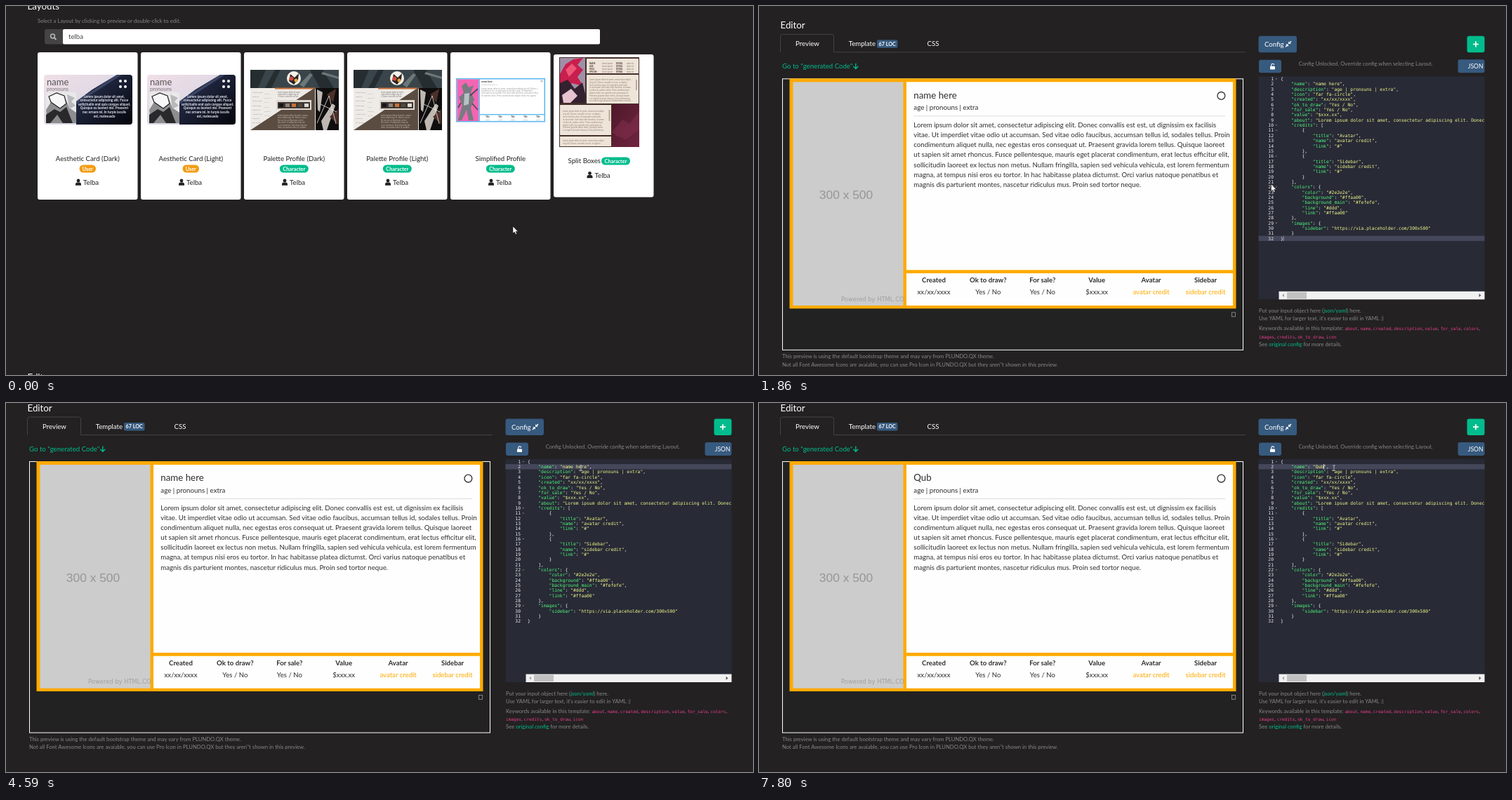
Recreate the animation shown at these times as an HTML page. Size 1064x526 px, loop 8000 ms.

```html
<!DOCTYPE html>
<html lang="en">
<head>
<meta charset="utf-8">
<title>Layout editor</title>
<style>
html, body { margin: 0; width: 100%; height: 100%; overflow: hidden; background: #232122; }
svg { display: block; width: 100%; height: 100%; font: 9.65px Lato, sans-serif; }
text { white-space: pre; }
.mono { font-family: "DejaVu Sans Mono", monospace; }
.mid { text-anchor: middle; }
.end { text-anchor: end; }
.bold { font-weight: 700; }
.hover text.link { text-decoration: underline; }
</style>
</head>
<body>
<svg id="stage" viewBox="0 0 1064 526"></svg>
<script>
const LOOP = 8000, BASE = 9.65, SMALL = 7.7, HEAD = 13.3;
const GREEN = '#00bc8c', BLUE = '#375a7f', GREY = '#888', INK = '#2e2e2e', ORANGE = '#ffaa00';
const AUTHOR = 'Telba', CODE_X = 743, CHAR = 3.825, LINE = 7.34, FULL_SCROLL = 522;

const rect = (x, y, w, h, fill, rx = 0, extra = '') =>
  `<rect x="${x}" y="${y}" width="${w}" height="${h}" fill="${fill}" rx="${rx}" ${extra}/>`;
const path = (d, fill, extra = '') => `<path d="${d}" fill="${fill}" ${extra}/>`;
const stroke = (d, color, width) => path(d, 'none', `stroke="${color}" stroke-width="${width}"`);
const circle = (x, y, r, fill, extra = '') => `<circle cx="${x}" cy="${y}" r="${r}" fill="${fill}" ${extra}/>`;
const text = (x, y, str, size, fill, cls = '', extra = '') =>
  `<text x="${x}" y="${y}" font-size="${size}" fill="${fill}" class="${cls}" ${extra}>${str}</text>`;
const span = (str, fill, extra = '') => `<tspan fill="${fill}" ${extra}>${str}</tspan>`;
const group = (x, y, body, extra = '') => `<g transform="translate(${x} ${y})" ${extra}>${body}</g>`;
const repeat = (n, make) => Array.from({ length: n }, (_, i) => make(i)).join('');

const lorem = [
  'Lorem ipsum dolor sit amet, consectetur adipiscing elit. Donec convallis est est, ut dignissim ex facilisis',
  'vitae. Ut imperdiet vitae odio ut accumsan. Sed vitae odio faucibus, accumsan tellus id, sodales tellus. Proin',
  'condimentum aliquet nulla, nec egestas eros consequat ut. Praesent gravida lorem tellus. Quisque laoreet',
  'ut sapien sit amet rhoncus. Fusce pellentesque, mauris eget placerat condimentum, erat lectus efficitur elit,',
  'sollicitudin laoreet ex lectus non metus. Nullam fringilla, sapien sed vehicula vehicula, est lorem fermentum',
  'magna, at tempus nisi eros eu tortor. In hac habitasse platea dictumst. Orci varius natoque penatibus et',
  'magnis dis parturient montes, nascetur ridiculus mus. Proin sed tortor neque.'
];
const loremText = lorem.join(' ');
const tiny = (x, y, rows, gap, chars, size, fill, cls) =>
  repeat(rows, i => text(x, y + i * gap, loremText.substr(i * chars, chars).trim(), size, fill, cls));

// ---- layout thumbnails, drawn relative to the left edge of their card ----
const aestheticThumb = () =>
  rect(9, 98, 126, 71, 'url(#sky)', 4) +
  path('M55 169V136L78 119 113 98H131Q135 98 135 102V165Q135 169 131 169Z', 'url(#night)') +
  path('M55 136L113 98H120L55 140Z', '#59658a', 'opacity=".5"') +
  text(13, 113, 'name', 13, '#555') + text(13, 121, 'pronouns', 7.5, '#777') +
  rect(12, 123, 43, 44, '#e9e9ea', 4) +
  path('M12 148L19 137 27 126 40 133 45 145 55 152V167H14Z', '#8d8d8f') +
  path('M16 129L27 124 38 128 41 139 32 146 19 137Z', '#f7f7f7', 'stroke="#222" stroke-width="1.2"') +
  path('M12 155L24 147 32 151 41 144 50 167H36L28 155 18 167H12Z', '#29292b') +
  path('M42 126L53 131 48 136 54 142 45 147Z', '#b9b9bb') +
  [[118, 107], [125, 107], [118, 115], [125, 115]].map(([x, y]) => circle(x, y, 2, '#fff')).join('') +
  ['Lorem ipsum dolor sit amet,', 'consectetur adipiscing elit. Fusce', 'sollicitudin erat quis congue aliquet.',
   'Quisque eu laoreet nisl. Praesent', 'nec ornare mi. In turpis iaculis', 'est, malesuada']
    .map((s, i) => text(95, 130.5 + i * 5.6, s, 4.7, '#e8e8ee', 'mid bold')).join('');

const paletteThumb = () =>
  rect(9, 91, 126, 86, '#eeeae6') +
  rect(9, 91, 126, 26, '#39454a') +
  path('M9 91H31L20 117H9ZM44 91H52L39 117H30ZM94 91H112L128 117H108Z', '#252d31') +
  path('M112 94L135 101V104L110 97ZM79 112L94 96 98 98 85 116Z', '#6c7777') +
  circle(71, 103, 10, '#f4f1ea') +
  path('M64 107L66 97 72 102 78 96 77 105 71 112Z', '#2a2422') +
  circle(67.5, 103.5, 3, '#cc493b') + circle(74, 106, 2.5, '#e2a33d') +
  rect(44, 116.5, 58, 2, '#c87037') + tiny(48, 124, 3, 3.2, 27, 2.7, '#777') +
  tiny(12, 124, 8, 6.2, 11, 2.6, '#888') + tiny(29, 126, 6, 6.2, 7, 2.6, '#aaa') +
  path('M9 177L101 116.5V177Z', '#5b4c41') +
  tiny(48, 157, 6, 3.4, 34, 2.8, '#c5b9ae') +
  rect(46, 134, 50, 14, '#ded8d1') + rect(48, 137, 46, 9, '#3d3531') +
  repeat(5, i => rect(50 + i * 9, 139, 6, 5, ['#161616', '#8c8179', '#c87037', '#51483f', '#e0dad2'][i])) +
  rect(102, 117, 33, 60, '#0f0d0d') +
  path('M104 119L112 123 108 151 105 148ZM110 164L126 139 130 142 118 177H113Z', '#bfb8b2') +
  path('M118 126L131 118 127 138ZM122 158L134 147V169Z', '#4b3029') +
  stroke('M104 167L121 128 131 168M109 140L132 151', '#ece8e2', .8);

const simplifiedThumb = () =>
  rect(8.7, 103.7, 125.6, 61, '#fff', 0, 'stroke="#5db9ef" stroke-width="1.6"') +
  rect(9.5, 104.5, 31, 59.5, '#f365b2') +
  path('M16 114L22 109 26 116 33 113 29 123 34 133 29 145 33 163H26L23 148 16 163H11L17 141 12 130 19 124Z', '#777b82') +
  path('M20 125L27 124 26 140 19 142Z', '#b9c1c6') +
  stroke('M28 128L39 118M31 139L39 148M15 138L11 145', '#4b4e56', 1.8) +
  rect(40.5, 104, 1.5, 60, '#5db9ef') + rect(42, 154, 92, 1.4, '#5db9ef') +
  text(44, 109, 'name here', 3.4, '#333', 'bold') + tiny(44, 113, 1, 3, 20, 2.5, '#888') +
  tiny(44, 119, 4, 3.2, 64, 2.9, '#999') + circle(130, 107, 1.2, 'none', 'stroke="#777" stroke-width=".5"') +
  repeat(5, i => text(53 + i * 18, 159, 'Title', 2.8, '#333', 'mid bold') +
                 text(53 + i * 18, 162.5, 'value', 2.6, '#888', 'mid'));

const splitThumb = () =>
  rect(8, 73, 114, 128, '#44302b') +
  rect(9, 74, 36, 64, '#a18fa7') +
  path('M9 97L17 83 28 76 42 74 34 84 42 91 34 101 42 114 26 110 17 124 9 119Z', '#c71f4e') +
  path('M17 91L26 82 33 89 22 101Z', '#ef5577') +
  path('M9 110L20 105 30 118 41 109 45 125V138H9Z', '#33212f') +
  path('M12 127L25 118 34 128 24 138H14Z', '#e6c3cf') +
  rect(47, 75, 74, 21, '#eee4d8') +
  repeat(4, i => text(51, 83 + i * 4, ['NAME', 'AGE', 'ROLE', 'SPECIES'][i], 2.8, '#44302b', 'bold') +
                 text(69, 83 + i * 4, 'lorem ipsum', 2.8, '#8a7468') +
                 text(89, 83 + i * 4, 'DETAIL', 2.8, '#44302b', 'bold') +
                 text(104, 83 + i * 4, 'dolor sit', 2.8, '#8a7468')) +
  rect(47, 98, 74, 41, '#eee4d8') + tiny(51, 106, 9, 3.8, 46, 2.9, '#947e72') +
  rect(117, 105, 2, 15, '#bba99c') +
  rect(9, 141, 73, 43, '#eee4d8') + tiny(13, 151, 8, 3.9, 46, 2.9, '#947e72') +
  rect(78.5, 148, 2, 16, '#bba99c') +
  rect(9, 186, 73, 14, '#eee4d8') + tiny(13, 193, 2, 3.8, 46, 2.9, '#947e72') +
  rect(83, 140, 39, 61, 'url(#wine)') +
  path('M83 180L98 162 108 168 122 150V176L103 190 92 186Z', '#8a3150', 'opacity=".45"');

// ---- layouts section ----
const badge = (x, y, w, label, fill) =>
  rect(x, y, w, 11, fill, 5.5) + text(x + w / 2, y + 8, label, 7.3, '#fff', 'mid bold');
const author = (x, y) =>
  circle(x + 4, y - 6, 2.4, '#222') + path(`M${x} ${y + .8}V${y - 1}q0-2.4 2.4-2.4h3.2q2.4 0 2.4 2.4V${y + .8}z`, '#222') +
  text(x + 11, y, AUTHOR, 9.7, '#222', 'link');

const card = ([title, type, thumb], i) => {
  const last = i === 5, isUser = type === 'User', w = isUser ? 23.5 : 41;
  const color = isUser ? '#f39c12' : GREEN;
  const body = last
    ? rect(0, 69, 142.5, 203.5, '#fff', 3) + thumb() + text(20.5, 224, title, 9.7, '#222', 'link') +
      badge(68, 215.5, w, type, color) + author(47.5, 244.5)
    : rect(0, 66, 142.5, 210, '#fff', 3) + thumb() + text(71.3, 220.5, title, 9.7, '#222', 'mid link') +
      badge(71.3 - w / 2, 226.5, w, type, color) + author(54, 255);
  return group(45 + 147 * i, 0, body, `id="card${i}"`);
};

const layouts =
  text(30.5, 5, 'Layouts', HEAD, '#fff') +
  text(45, 24, 'Select a Layout by clicking to preview or double-click to edit.', SMALL, GREY) +
  rect(55, 33, 30, 21.5, '#444', 3) + rect(81, 33, 765, 21.5, '#fff', 2) +
  circle(66.5, 43, 2.9, 'none', 'stroke="#bbb" stroke-width="1.5"') + stroke('M68.6 45.2L71.5 48', '#bbb', 1.8) +
  text(89, 47.3, AUTHOR.toLowerCase(), 9.7, '#444') +
  rect(632, 65, 144.5, 212, 'none', 4, `id="focusRing" stroke="${BLUE}" stroke-width="2"`) +
  [['Aesthetic Card (Dark)', 'User', aestheticThumb], ['Aesthetic Card (Light)', 'User', aestheticThumb],
   ['Palette Profile (Dark)', 'Character', paletteThumb], ['Palette Profile (Light)', 'Character', paletteThumb],
   ['Simplified Profile', 'Character', simplifiedThumb], ['Split Boxes', 'Character', splitThumb]].map(card).join('');

// ---- preview pane ----
const columns = [['Created', 'xx/xx/xxxx'], ['Ok to draw?', 'Yes / No'], ['For sale?', 'Yes / No'],
                 ['Value', '$xxx.xx'], ['Avatar', 'avatar credit'], ['Sidebar', 'sidebar credit']];
const preview =
  rect(33.5, 83.5, 656, 386.5, '#222', 0, 'stroke="#fff"') +
  rect(43.5, 83, 636, 328, ORANGE, 0, 'class="shrink" data-h="328"') +
  rect(48.5, 88, 157, 318.7, '#ccc', 0, 'class="shrink" data-h="318.7"') +
  rect(210, 88, 465, 268, '#fefefe', 0, 'class="shrink" data-h="268"') +
  text(124, 255, '300 x 500', 17.4, '#969696', 'mid', 'id="size" style="font-family:\'Liberation Sans\',sans-serif"') +
  text(220.3, 111.3, '', HEAD, INK, '', 'id="heading"') +
  circle(658.4, 107.6, 5.4, 'none', `stroke="${INK}" stroke-width="1.3"`) +
  group(0, 0,
    `<g clip-path="url(#sidebarClip)">${text(117, 400.3, 'Powered by HTML.COM', 8.4, '#a0a0a0', '', 'style="font-family:\'DejaVu Sans\',sans-serif"')}</g>` +
    text(220.3, 128, 'age | pronouns | extra', 9.75, INK) + rect(220, 136, 444, 1, '#ddd') +
    lorem.map((s, i) => text(220.3, 152.7 + i * 14.15, s, 9.66, INK)).join('') +
    rect(210, 360.7, 465, 46, '#fefefe') +
    columns.map(([head, value], i) =>
      text(249 + i * 77.4, 374, head, BASE, INK, 'mid bold') +
      text(249 + i * 77.4, 391, value, BASE, i > 3 ? ORANGE : INK, 'mid')).join('') +
    rect(673.5, 416.5, 5, 6, 'none', 0, 'stroke="#999" stroke-width=".8"'), 'id="flow"') +
  text(33, 482, 'This preview is using the default bootstrap theme and may vary from PLUNDO.QX theme.', SMALL, GREY) +
  text(33, 493.3, "Not all Font Awesome Icons are avaiable, you can use Pro Icon in PLUNDO.QX but they aren''t shown in this preview.", SMALL, GREY);

// ---- code pane ----
const credit = (title, name) => ({ title, name, link: '#' });
const config = {
  name: 'name here', description: 'age | pronouns | extra', icon: 'far fa-circle', created: 'xx/xx/xxxx',
  ok_to_draw: 'Yes / No', for_sale: 'Yes / No', value: '$xxx.xx', about: loremText,
  credits: [credit('Avatar', 'avatar credit'), credit('Sidebar', 'sidebar credit')],
  colors: { color: '#2e2e2e', background: '#ffaa00', background_main: '#fefefe', line: '#ddd', link: '#ffaa00' },
  images: { sidebar: 'https://via.placeholder.com/300x500' }
};
const highlight = line => line.slice(0, 90)
  .replace(/^( *)("[^"]*")(: )?("[^"]*"?)?/, (_, pad, key, colon = '', value = '') =>
    pad + span(key, '#50fa7b') + colon + span(value, '#f1fa8c'));
const codeLines = JSON.stringify(config, null, 4).split('\n');
const lineBase = i => 85.8 + i * LINE;

const codePane =
  rect(711.5, 80, 322, 318, '#282a36') +
  rect(711.5, 0, 322, LINE, '#44475a', 0, 'id="activeLine"') +
  `<g clip-path="url(#codeClip)">` + codeLines.map((line, i) =>
    text(733, lineBase(i), i + 1, 6.35, '#f0f0ee', 'mono end') +
    (/[{[]$/.test(line) ? path(`M735.6 ${lineBase(i) - 2.8}h2.6l-1.3 1.6z`, '#85868c') : '') +
    text(CODE_X, lineBase(i), highlight(line), 6.35, '#f8f8f2', 'mono', `id="code${i}"`)).join('') + '</g>' +
  rect(0, 0, .9, 7.3, '#f8f8f0', 0, 'id="caret"') +
  rect(740.5, 386.5, 293, 11.5, '#f1f1f1') + rect(752, 387.5, 28, 9.5, '#c1c1c1') +
  path('M748 389.8v5l-2.8-2.5z', '#a3a3a3') + path('M1025.6 389.8v5l2.8-2.5z', '#505050');

const keywords = words => words.split(' ').map(w => span(w, '#e83e8c', 'class="mono" font-size="6.1"')).join(', ');
const configPane =
  rect(711.5, 22.5, 54.5, 23.5, BLUE, 3) + text(720, 37.7, 'Config', BASE, '#fff') +
  stroke('M754.6 33.4L758 30M753.4 34.6L750 38', '#fff', 1.4) +
  path('M754.2 30.2V33.8H757.8ZM753.8 37.8V34.2H750.2Z', '#fff') +
  rect(1008.5, 22.5, 25, 23.5, GREEN, 3) + stroke('M1017 34.2h8M1021 30.2v8', '#fff', 1.7) +
  rect(712, 56.5, 32, 18.5, BLUE, 3) + rect(728, 65.5, 7, 4.6, '#fff', .8) +
  stroke('M729.8 66V63.8a1.9 1.9 0 0 1 3.8 0', '#fff', 1.1) +
  text(768.7, 64.5, 'Config Unlocked, Override config when selecting Layout.', SMALL, GREY) +
  rect(995.5, 56, 38, 19, BLUE, 3) + text(1009.8, 68.8, 'JSON', 8.6, '#fff') +
  codePane +
  text(712, 416.7, `Put your input object here (${span('json/yaml', GREEN)}) here.`, SMALL, GREY) +
  text(712, 428, "Use YAML for larger text, it's easier to edit in YAML :)", SMALL, GREY) +
  text(712, 442, 'Keywords available in this template: ' +
    keywords('about name created description value for_sale colors') + ',', SMALL, GREY) +
  text(712, 453.3, keywords('images credits ok_to_draw icon'), SMALL, GREY) +
  text(712, 464.3, `See ${span('original config', GREEN)} for more details.`, SMALL, GREY);

const editor =
  text(30.5, 11.8, 'Editor', HEAD, '#fff') +
  stroke('M30 45.5H30.5V23Q30.5 20 33.5 20H103.5Q106.5 20 106.5 23V45.5H693', '#444', 1) +
  text(69, 36.8, 'Preview', BASE, '#fff', 'mid') + text(127.7, 36.8, 'Template', BASE, '#fff') +
  rect(168, 28, 29.5, 11.5, BLUE, 2) + text(182.7, 36.4, '67 LOC', 7.2, '#fff', 'mid bold') +
  text(239.5, 36.8, 'CSS', BASE, '#fff') +
  text(33, 68.8, 'Go to "generated Code"', BASE, GREEN) +
  stroke('M137.8 61.5V69M134.3 65.7L137.8 69.2 141.3 65.7', GREEN, 1.4) +
  preview + configPane;

const cursors = {
  arrow: path('M0 0V10L2.3 8 4 11.4 5.6 10.6 4 7.4H7.2Z', '#fff', 'stroke="#111" stroke-width=".5"'),
  hand: path('M0 0C-1 0-1 1-1 1.5V6.5L-2.2 5.5C-3 5-3.8 6-3 7L0 11V12.5H5V11L6 8V5C6 4 5 4 4.6 4.5 4.4 3.5 3.4 3.5 3 4 2.7 3.3 1.8 3.2 1.3 3.7V1.3C1.3.5.8 0 0 0Z',
    '#fff', 'stroke="#222" stroke-width=".8"'),
  beam: stroke('M-1.8-3.7H1.8M0-3.7V3.7M-1.8 3.7H1.8', '#ccc', .8)
};

const stage = document.getElementById('stage');
const gradient = (id, from, to) =>
  `<linearGradient id="${id}" x2="1" y2="1"><stop stop-color="${from}"/><stop offset="1" stop-color="${to}"/></linearGradient>`;
stage.innerHTML =
  `<defs>${gradient('sky', '#f1dfe6', '#cbd3e4')}${gradient('night', '#2c3557', '#05060c')}${gradient('wine', '#4d1829', '#712541')}
   <clipPath id="codeClip">${rect(711.5, 80, 322, 306)}</clipPath>
   <clipPath id="sidebarClip">${rect(48, 80, 158, 340)}</clipPath></defs>` +
  group(0, 0, layouts, 'id="layouts"') + group(0, 0, editor, 'id="editor"') +
  group(0, 0, Object.entries(cursors).map(([name, art]) => `<g id="${name}">${art}</g>`).join(''), 'id="pointer"');

// ---- motion ----
const el = id => document.getElementById(id);
const set = (id, name, value) => el(id).setAttribute(name, value);
const move = (id, x, y) => set(id, 'transform', `translate(${x} ${y})`);
const latest = (keys, t) => keys.filter(k => k[0] <= t).pop();

const scrollKeys = [[0, 0], [1750, 435.5], [1800, 477], [1860, 501.7], [1910, 516], [1960, FULL_SCROLL]];
const nameKeys = [[0, 'name here'], [4910, 'name '], [5160, 'name'], [5360, 'nam'], [5600, 'na'], [6050, 'n'],
                  [6570, ''], [7410, 'Q'], [7520, 'Qu'], [7800, 'Qub']];
const pointerKeys = [[0, 722, 314], [310, 722, 314], [690, 729.5, 254], [2360, 729.5, 254], [2620, 778, 190],
                     [2880, 858, 118], [3060, 835, 98.5], [3110, 822, 97.5], [3220, 822, 97.5], [3290, 819, 92.7],
                     [LOOP, 819, 92.7]];
const CLICK = 3460, CARET_END = 4090, BLINK = 500, FOCUS = 970, FOCUS_FADE = 260;

function pointerAt(t) {
  const i = pointerKeys.findIndex(k => k[0] > t);
  const [t0, x0, y0] = pointerKeys[i - 1], [t1, x1, y1] = pointerKeys[i];
  const p = (t - t0) / (t1 - t0);
  return [x0 + (x1 - x0) * p, y0 + (y1 - y0) * p];
}

function draw(t) {
  const scroll = latest(scrollKeys, t)[1];
  move('layouts', 0, -scroll);
  move('editor', 0, FULL_SCROLL - scroll);

  const [x, y] = pointerAt(t);
  const onCard = scroll === 0 && y < 276;
  const shape = onCard ? 'hand' : scroll > 0 && x > 741 ? 'beam' : 'arrow';
  move('pointer', x, y);
  for (const name in cursors) set(name, 'visibility', name === shape ? 'visible' : 'hidden');
  el('card4').classList.toggle('hover', onCard);
  set('focusRing', 'opacity', t < FOCUS ? 0 : .5 * Math.min(1, (t - FOCUS) / FOCUS_FADE));

  const [typedAt, name] = latest(nameKeys, t);
  const clicked = t >= CLICK, settled = t >= CARET_END;
  const column = clicked ? 13 + (settled ? name.length : 7) : 1;
  const rowY = 79.8 + (clicked ? 1 : 31) * LINE;
  const idle = t - (typedAt || CARET_END);
  const caretOn = !settled || idle % (2 * BLINK) < BLINK;
  set('activeLine', 'y', rowY);
  set('caret', 'x', CODE_X + CHAR * column - .2);
  set('caret', 'y', rowY);
  set('caret', 'opacity', clicked ? +caretOn : .5);
  el('code1').innerHTML = highlight(`    "name": "${name}",`);
  el('heading').textContent = name;

  // an empty heading collapses and pulls the card content up
  const gap = name ? 0 : 16;
  move('flow', 0, -gap);
  move('size', 0, -gap / 2);
  for (const box of document.querySelectorAll('.shrink')) box.setAttribute('height', box.dataset.h - gap);
}

const start = performance.now();
(function tick() {
  draw((performance.now() - start) % LOOP);
  requestAnimationFrame(tick);
})();
</script>
</body>
</html>
```
